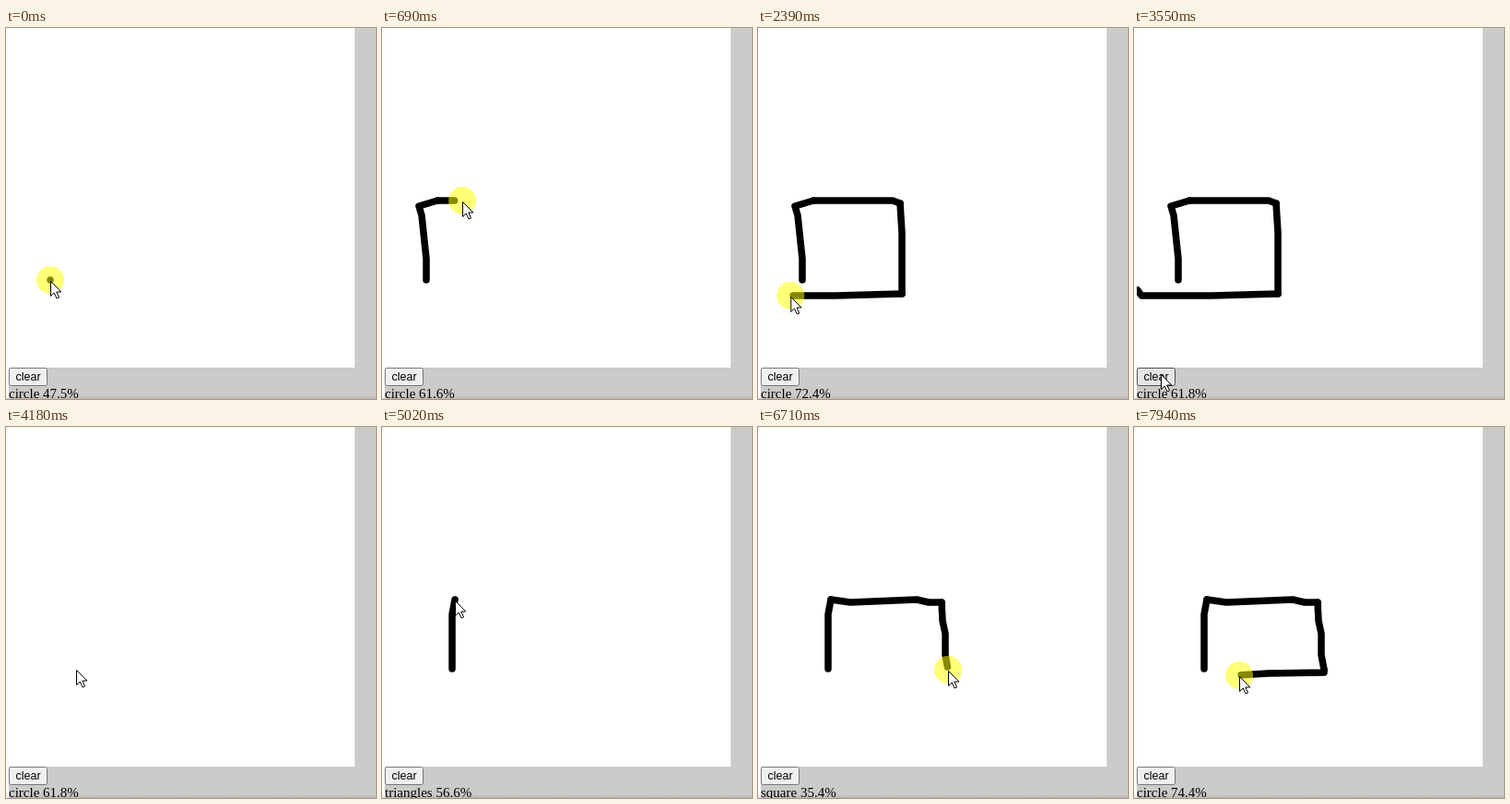
An HTML page that plays this animation: 401 by 402 pixels, repeating every 8 s.

```html
<!DOCTYPE html>
<html lang="en">
<head>
<meta charset="utf-8">
<title>Shape guess</title>
<style>
  html, body { margin: 0; width: 100%; height: 100%; overflow: hidden; background: #cbcbc9; }
  svg { display: block; width: 401px; height: 402px; }
  #ink { fill: none; stroke: #000; stroke-width: 7.5; stroke-linecap: round; stroke-linejoin: round; }
  #label { font: 12.5px "Liberation Sans", Arial, sans-serif; }
  #guess { font: 15px "Liberation Serif", "Times New Roman", serif; }
</style>
</head>
<body>
<svg viewBox="0 0 401 402">
  <defs>
    <clipPath id="sheet"><rect x="3" width="375" height="368"/></clipPath>
    <linearGradient id="shade" x2="0" y2="1">
      <stop stop-opacity="0"/><stop offset="1" stop-opacity=".1"/>
    </linearGradient>
  </defs>
  <rect width="3" height="402" fill="#fbfbfb"/>
  <rect x="3" width="375" height="368" fill="#fff"/>
  <g id="ink" clip-path="url(#sheet)"></g>
  <rect id="button" x="3.5" y="368.5" width="41" height="19" rx="2"/>
  <text id="label" x="10.5" y="382">clear</text>
  <text id="guess" x="3" y="401"></text>
  <rect y="398" width="401" height="4" fill="url(#shade)"/>
  <g id="pointer">
    <circle id="glow" r="15" fill="#ff0" fill-opacity=".53"/>
    <path d="M.5 1.5V17.5L4.2 14L7 20L9.5 19L6.8 13H11.8Z" fill="#fff" stroke="#000"/>
  </g>
</svg>
<script>
const LOOP = 8000, STEP = 1000 / 13;
const CLEAR = 51, LAG = 0.25;   // in steps; ink trails the pointer a little

const $ = id => document.getElementById(id);
const clamp = v => Math.max(0, Math.min(1, v));

// Each leg runs at an even speed; the pointer rests between legs.
function leg(from, to, d, pen = true) {
  const path = document.createElementNS("http://www.w3.org/2000/svg", "path");
  path.setAttribute("d", d);
  path.setAttribute("pathLength", 1);
  if (pen) $("ink").append(path);
  return { from, to, path, pen, length: path.getTotalLength() };
}

const legs = [
  leg(0, 8, "M48 273V250L43 203L40 193L60 187"),
  leg(8.2, 11, "M60 187H146L154 190"),
  leg(11, 20, "M154 190L156 222V288"),
  leg(20.5, 34, "M156 288L84 290H8L4 284"),
  leg(34, 36, "M4 284L33 307", false),
  leg(40, 46, "M33 307L29 374", false),
  leg(50, 54, "M29 374L76 262", false),
  leg(58, 64, "M76 262V203L79 187"),
  leg(73, 80, "M79 187L100 190L172 187L185 190H199"),
  leg(81, 87, "M199 190L200 210L203 224V247L206 263"),
  leg(92, 103, "M206 263V266L145 267L114 269")
];

// [step, percent]
const scores = [
  [0, 47.5], [9, 61.6], [22, 96.1], [35, 61.8], [59, 61.8],
  [65, 56.6], [73, 56.6], [87, 35.4], [103, 74.4]
];

function score(n) {
  const i = scores.findIndex(s => s[0] >= n);
  if (i < 1) return scores.at(i)[1];
  const [[n0, p0], [n1, p1]] = scores.slice(i - 1, i + 1);
  return p0 + (p1 - p0) * (n - n0) / (n1 - n0);
}

const word = n => n < 59 || n > 92 ? "circle" : n < 82 ? "triangles" : "square";

function drawInk(n) {
  for (const { from, to, path, pen } of legs) {
    if (!pen) continue;
    const shown = n >= from && (from < CLEAR) === (n < CLEAR);
    path.setAttribute("visibility", shown ? "visible" : "hidden");
    path.setAttribute("stroke-dasharray", clamp((n - LAG - from) / (to - from)) + " 2");
  }
}

function pointerAt(n) {
  const { from, to, path, length } = legs.findLast(l => l.from <= n);
  return path.getPointAtLength(length * clamp((n - from) / (to - from)));
}

function draw(now) {
  const n = Math.floor((now % LOOP + 3) / STEP);
  const { x, y } = pointerAt(n);
  const pressed = n < 35 || n === 50 || (n > 57 && n < 65) || n > 70;
  const hover = x < 45 && y > 367;
  drawInk(n);
  $("pointer").setAttribute("transform", `translate(${x} ${y})`);
  $("glow").setAttribute("visibility", pressed ? "visible" : "hidden");
  $("button").setAttribute("fill", hover ? "#e5e5e5" : "#efefef");
  $("button").setAttribute("stroke", hover ? "#4f4f4f" : "#767676");
  $("guess").textContent = `${word(n)} ${score(n).toFixed(1)}%`;
}

const start = performance.now();
function tick() {
  draw(performance.now() - start);
  requestAnimationFrame(tick);
}
tick();
</script>
</body>
</html>
```
